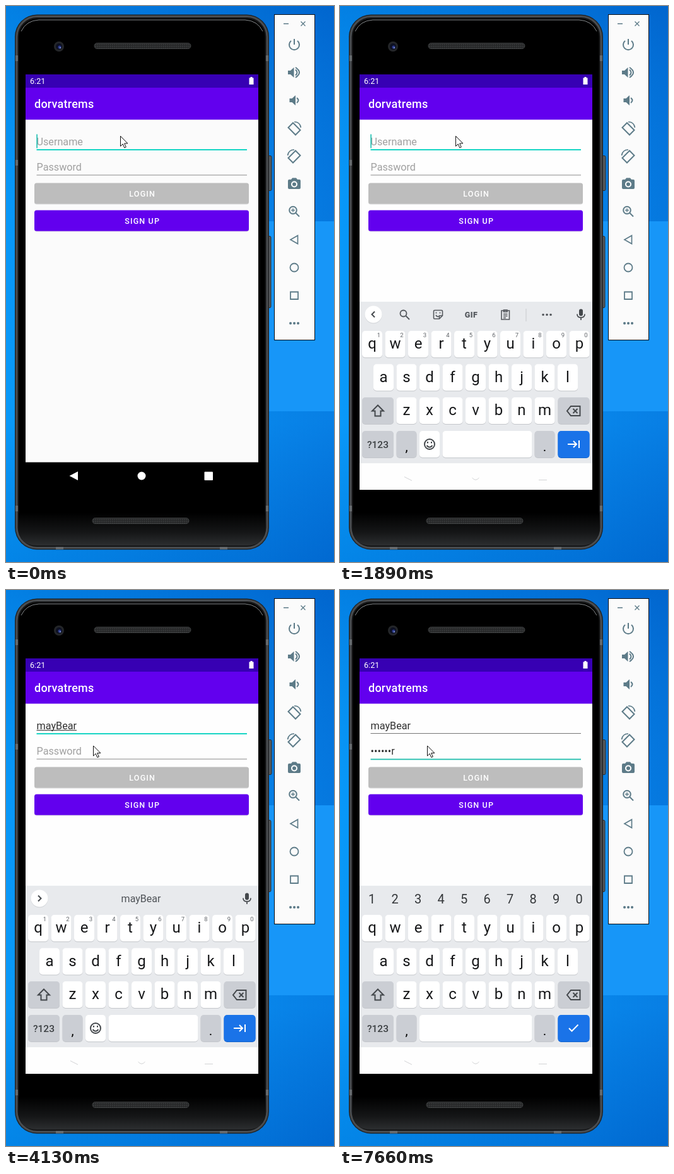
Animation, 520 px wide and 878 px high, one loop 8 s. Source, as an HTML page:

```html
<!DOCTYPE html>
<html lang="en">
<head>
<meta charset="utf-8">
<title>Login demo</title>
<style>
html, body { margin: 0; width: 100%; height: 100%; overflow: hidden; }
svg { display: block; width: 100%; height: 100%; }
text { font-family: Roboto, Arial, sans-serif; white-space: pre; }
.mid { text-anchor: middle; }
.line { fill: none; stroke-width: 2; }
.btn { font-size: 12.57px; font-weight: 500; letter-spacing: 1.12px; fill: #fff; }
.field { font-size: 16.2px; }
.key { font-size: 24px; fill: #17181a; }
.hint { font-size: 9.5px; fill: #5f6368; }
.word { font-size: 16px; fill: #4f5358; }
</style>
</head>
<body>
<svg viewBox="0 0 520 878" preserveAspectRatio="none">
  <defs>
    <linearGradient id="sky">
      <stop stop-color="#0595f6"/><stop offset=".75" stop-color="#0379e0"/><stop offset="1" stop-color="#026dd6"/>
    </linearGradient>
    <linearGradient id="shade" x2="0" y2="1">
      <stop stop-color="#0058c0" stop-opacity=".35"/><stop offset=".35" stop-color="#12a0ff" stop-opacity=".2"/>
      <stop offset=".75" stop-color="#12a0ff" stop-opacity=".35"/><stop offset="1" stop-color="#0060c4" stop-opacity=".3"/>
    </linearGradient>
    <linearGradient id="chin" x2="0" y2="1">
      <stop stop-color="#000"/><stop offset=".6" stop-color="#151617"/><stop offset="1" stop-color="#2c2e30"/>
    </linearGradient>
    <pattern id="mesh" width="3" height="3" patternUnits="userSpaceOnUse">
      <path fill="#252627" d="M0 0h3v3H0z"/><path fill="#434546" d="M0 0h1.5v1.5H0z"/>
    </pattern>
    <clipPath id="screen"><path d="M31 108H400V764H31z"/></clipPath>
  </defs>

  <path fill="url(#sky)" d="M0 0H520V878H0z"/>
  <path fill="url(#shade)" d="M0 0H520V878H0z"/>
  <rect x="340" y="340" width="300" height="300" fill="#1796f8"/>

  <!-- phone body -->
  <g fill="#55595c" stroke="#2b2d2f">
    <rect x="414" y="236.500" width="7" height="55" rx="2"/>
    <rect x="414" y="363.500" width="6" height="113" rx="2"/>
  </g>
  <rect x="14" y="13.500" width="403" height="845" rx="35" fill="#222426"/>
  <rect x="15.500" y="15" width="400" height="842" rx="33.500" fill="#4a4d50"/>
  <rect x="18.500" y="18" width="394" height="836" rx="30.500" fill="#141516"/>
  <rect x="20.500" y="20.500" width="390" height="831" rx="28" fill="#000"/>
  <path d="M20 800H411V824Q410 852 382 852H49Q21 852 20 824z" fill="url(#chin)"/>
  <path class="line" stroke="#85898c" style="stroke-width:1" d="M24 40Q32 23 52 22H379Q399 23 407 40"/>
  <path fill="#65696c" d="M15 78h4v9h-4zM412 78h4v9h-4zM15 243h4v9h-4zM15 789h4v9h-4zM412 789h4v9h-4zM79 854h12v4h-12zM339 854h12v4h-12z"/>
  <circle cx="84" cy="64" r="8" fill="#242629"/><circle cx="84" cy="64" r="5" fill="#0d1022"/>
  <circle cx="85" cy="65" r="2.500" fill="#2d3c8c"/><circle cx="86" cy="66" r="1" fill="#93a6df"/>
  <g fill="url(#mesh)" stroke="#3b3d3e">
    <rect x="140" y="58.500" width="153" height="9" rx="4.500"/>
    <rect x="137" y="808.500" width="153" height="9" rx="4.500"/>
  </g>

  <!-- app -->
  <path id="page" d="M31 179H400V720.500H31z"/>
  <path fill="#3700b3" d="M31 108H400V129H31z"/>
  <path fill="#6200ee" d="M31 129H400V179.500H31z"/>
  <text x="38" y="123" font-size="12.600" fill="#fff">6:21</text>
  <path fill="#fff" d="M385.500 113.500h2v-1.500h3v1.500h2V124h-7z"/>
  <text x="45" y="161" font-size="18" font-weight="500" letter-spacing=".22" fill="#fff">dorvatrems</text>
  <text id="user" class="field" x="48.500" y="220"></text>
  <text id="pass" class="field" x="48.500" y="260"></text>
  <path id="spell" stroke="#333"/>
  <rect id="userLine" x="48.500" width="333.500"/>
  <rect id="passLine" x="48.500" width="333.500"/>
  <rect id="caret" width="1.600" height="22" fill="#19bfb0"/>
  <g fill="#e4e4e6"><rect x="45" y="281" width="340" height="32.500" rx="3.500"/><rect x="45" y="324" width="340" height="32.500" rx="3.500"/></g>
  <rect x="45" y="279.500" width="340" height="33" rx="3.500" fill="#bdbdbd"/>
  <rect x="45" y="322.500" width="340" height="33" rx="3.500" fill="#6200ee"/>
  <text class="btn mid" x="216.200" y="301">LOGIN</text>
  <text class="btn mid" x="216.200" y="344">SIGN UP</text>
  <g fill="#fff"><path d="M114 735v14l-13.500-7z"/><circle cx="215" cy="742" r="6.500"/><rect x="314.500" y="735.500" width="13.500" height="13.500" rx="1"/></g>

  <!-- keyboard -->
  <g clip-path="url(#screen)"><g id="board">
    <path fill="#e8eaed" d="M31 467H400V722H31z"/>
    <path fill="#fefefe" d="M31 722H400V764H31z"/>
    <path class="line" stroke="#d2d3d5" style="stroke-width:1" d="M102 743.500l12 6M209.500 745q5.500 6.500 11 0M315 748.500h13"/>
    <g id="keys"></g>
    <g id="texting">
      <circle cx="53" cy="488" r="13.500" fill="#cfd2d6"/><circle cx="53" cy="487" r="13.500" fill="#fff"/>
      <path id="chevron" class="line" stroke="#45494d"/>
      <g id="tools" fill="none" stroke="#54585d" stroke-width="1.800">
        <circle cx="100.500" cy="485.500" r="5"/><path d="M104.500 489.500l5.500 5.500"/>
        <path stroke-width="1.600" d="M150 480.500h11q1.500 0 1.500 1.500v7l-5 5H150q-1.500 0-1.500-1.500V482q0-1.500 1.500-1.500zM157.500 494v-5h5M152 488q2 3.500 4.500 2M152.500 483.500v2M158.500 483.500v2"/>
        <text class="mid" x="208" y="491.500" font-size="12.500" font-weight="900" letter-spacing=".5" fill="#54585d" stroke="none">GIF</text>
        <path stroke-width="1.600" d="M256 481h12.500v14H256zM259.500 480v3h5.500v-3zM259 486.500h6.500M259 489.500h6.500M259 492.500h4"/>
        <path stroke="#c8cacd" stroke-width="1" d="M295 478v20"/>
        <path stroke-width="3.600" stroke-linecap="round" d="M322 487.500h.1M328 487.500h.1M334 487.500h.1"/>
      </g>
      <g id="words"><path stroke="#c3c5c8" d="M160.500 476v22M268.500 476v22"/><text class="word mid" x="112" y="493"></text><text class="word mid" x="214" y="493"></text><text class="word mid" x="316" y="493"></text></g>
      <rect x="379" y="478.500" width="6" height="11" rx="3" fill="#44484c"/>
      <path class="line" stroke="#44484c" style="stroke-width:1.700" d="M376 486.500q0 5.500 6 5.500t6-5.500M382 492v4"/>
    </g>
    <g id="digits"></g>
  </g></g>

  <!-- emulator controls -->
  <rect x="425.500" y="13.500" width="64" height="514" fill="#fbfbfb" stroke="#080c12"/>
  <g id="panel" fill="none" stroke="#5d7b88" stroke-width="2">
    <path stroke-width="1.400" d="M440 28h8M467.500 24.500l7 7m0-7l-7 7"/>
    <path d="M457 52v9M452 55a8 8 0 1 0 10 0"/>
    <path id="horn" fill="#5d7b88" stroke="none" d="M447 102h4l5.500-5v16l-5.500-5h-4z"/>
    <path d="M459 100.500q5 4.500 0 9M459 97q12 8 0 16"/>
    <use href="#horn" x="2.500" y="44"/><path d="M461 145q5 4 0 8"/>
    <g id="turn"><path d="M455 184.500l11.500 11.500-7.500 7.500L447.500 192z"/><path stroke-width="1.700" d="M457 183q9 0 10.500 9"/></g>
    <use href="#turn" transform="matrix(-1 0 0 1 914 44)"/>
    <path fill="#5d7b88" stroke="none" d="M449 274h3l2-2.500h6l2 2.500h3q2 0 2 2v11q0 2-2 2h-16q-2 0-2-2v-11q0-2 2-2z"/>
    <circle cx="457" cy="281.500" r="4" stroke="#fff"/>
    <circle cx="455" cy="322.500" r="5.800"/><path d="M459 326.500l6 6"/><path stroke-width="1.400" d="M452 322.500h6m-3-3v6"/>
    <path d="M462.500 362.500v13l-11.500-6.500z" stroke-width="1.700"/><circle cx="457" cy="413" r="6.500" stroke-width="1.800"/>
    <path d="M451 451.500h12v11.500h-12z" stroke-width="1.800"/>
    <path stroke-width="4" stroke-linecap="round" d="M451 501h.1M457 501h.1M463 501h.1"/>
  </g>

  <path id="mouse" d="M.5 .5v16l3.700-3.600 2.600 6 2.500-1.100-2.600-5.800h5.200z" fill="#fff" stroke="#111"/>
</svg>
<script>
const $ = id => document.getElementById(id);
const set = (el, attrs) => { for (const k in attrs) el.setAttribute(k, attrs[k]); };
const passed = (times, t) => times.filter(s => t >= s).length;

const LOOP = 8000, NAME = 'mayBear', PITCH = 36.5;
const userTyped = [2010, 2130, 2270, 3140, 3260, 3380, 3500];
const userMarked = [2130, 2270, 2520, 3260, 3380, 3500, 3620];
const passTyped = [6040, 6160, 6280, 6800, 6920, 7040, 7160];
const blinks = [510, 1010, 1390, 1890, 3020, 3140, 4010, 4380, 5020, 5520, 7660];
const guesses = ['m my me', 'ma may man', 'may maybe mayor', 'mayB mayoral maybes'];

// Keyboard
const label = (s, x, y, cls, extra = '') => `<text class="${cls} mid" x="${x}" y="${y}" ${extra}>${s}</text>`;
const cap = (x, y, w, fill = '#fff', shadow = '#c4c7cb') =>
  `<rect x="${x}" y="${y + 1}" width="${w}" height="42" rx="5" fill="${shadow}"/>` +
  `<rect x="${x}" y="${y}" width="${w}" height="42" rx="5" fill="${fill}"/>`;
const icon = (d, color = '#44484c', id = '') => `<path id="${id}" class="line" stroke="${color}" d="${d}"/>`;

let keys = '', hints = '', digits = '';
[['qwertyuiop', 35, 513], ['asdfghjkl', 53, 565.5], ['zxcvbnm', 89.5, 618]].forEach(([row, x0, y]) =>
  [...row].forEach((c, i) => {
    const x = x0 + i * PITCH;
    keys += cap(x, y, 32) + label(c, x + 16, Math.ceil(y + 28), 'key');
  }));
[...'1234567890'].forEach((c, i) => {
  hints += label(c, 61.5 + i * PITCH, 523, 'hint');
  digits += label(c, 50.5 + i * PITCH, 495, '', 'font-size="20" fill="#34373a"');
});
const grey = '#cbced4';
keys += cap(35, 618, 50, grey) + cap(345.5, 618, 50, grey) + cap(35, 671, 50, grey) +
  cap(89.5, 671, 32, grey) + cap(308.5, 671, 32, grey) + cap(345.5, 671, 50, '#1a73e8', '#1765cc') +
  cap(162.5, 671, 142) +
  icon('M60 630.5l9 9h-4.5v8h-9v-8H51z') +
  icon('M366 632h14.5v15H366l-6-7.5zM369.500 636l7 7m0-7l-7 7') +
  label('?123', 60, 698, '', 'font-size="15.500" font-weight="500" fill="#3c4043"') +
  label(',', 105.5, 703, '', 'font-size="21"') + label('.', 324.5, 703, '', 'font-size="21"') +
  `<g id="smile">${cap(126, 671, 32)}<circle cx="142" cy="692" r="8" class="line" stroke="#44484c"/>` +
  icon('M137.5 694q4.5 5.500 9 0M139 688v2.5M145 688v2.5') + '</g>' +
  `<g id="wideSpace">${cap(126, 671, 178.5)}</g>` + icon('', '#fff', 'enter');
$('keys').innerHTML = keys + `<g id="hints">${hints}</g>`;
$('digits').innerHTML = digits;

const show = (id, on) => $(id).style.display = on ? '' : 'none';

function field(id, text, hint) {
  $(id).textContent = text || hint;
  $(id).style.fill = text ? '#303030' : '#a0a0a0';
}

function draw(t) {
  const onPass = t >= 4380, secret = t >= 4500;
  const n = passed(userTyped, t), marked = passed(userMarked, t), p = passed(passTyped, t);

  // Text fields
  field('user', NAME.slice(0, n), 'Username');
  field('pass', p ? '•'.repeat(p - 1) + NAME[p - 1] : '', 'Password');
  set($('userLine'), { y: 226, height: onPass ? 1 : 2, fill: onPass ? '#777' : '#18d5c5' });
  set($('passLine'), { y: 266.5, height: onPass ? 1.8 : 1, fill: onPass ? '#21bdad' : '#8c8c8c' });
  const markEnd = marked ? 48.5 + $('user').getSubStringLength(0, marked) : 48.5;
  set($('spell'), { d: `M48.5 221.5H${markEnd}` });
  show('spell', marked && !onPass);
  const active = onPass ? 'pass' : 'user', typed = onPass ? p : n;
  set($('caret'), {
    x: 48.3 + (typed ? $(active).getComputedTextLength() : 0),
    y: onPass ? 242.5 : 202.5
  });
  show('caret', passed(blinks, t) % 2 === 0);

  // Keyboard
  show('board', t >= 120);
  set($('page'), { fill: t < 120 ? '#fbfbfb' : '#fefefe' });
  set($('board'), { transform: `translate(0 ${t < 240 ? 90 : 0})` });
  for (const id of ['texting', 'hints', 'smile']) show(id, !secret);
  for (const id of ['digits', 'wideSpace']) show(id, secret);
  set($('enter'), { d: secret ? 'M363 692l4.5 4.5 10-10' : 'M361 692h14M370 687l5 5-5 5M379 686v12' });
  show('tools', !marked);
  show('words', marked);
  set($('chevron'), { d: marked ? 'M51 482.5l4.5 4.5-4.5 4.5' : 'M55 482.5l-4.5 4.5 4.5 4.5' });
  const many = marked <= guesses.length;
  const list = !marked ? [] : many ? guesses[marked - 1].split(' ') : ['', NAME.slice(0, marked), ''];
  const [bars, ...slots] = $('words').children;
  bars.style.display = many ? '' : 'none';
  slots.forEach((s, i) => s.textContent = list[i] || '');

  // Pointer
  const [x, y] = t < 120 ? [181, 205] : t < 4010 ? [183, 205] : t < 4130 ? [160, 226] : [138, 245.5];
  set($('mouse'), { transform: `translate(${x} ${y})` });
}

const start = performance.now();
function tick() {
  draw((performance.now() - start) % LOOP);
  requestAnimationFrame(tick);
}
tick();
</script>
</body>
</html>
```
